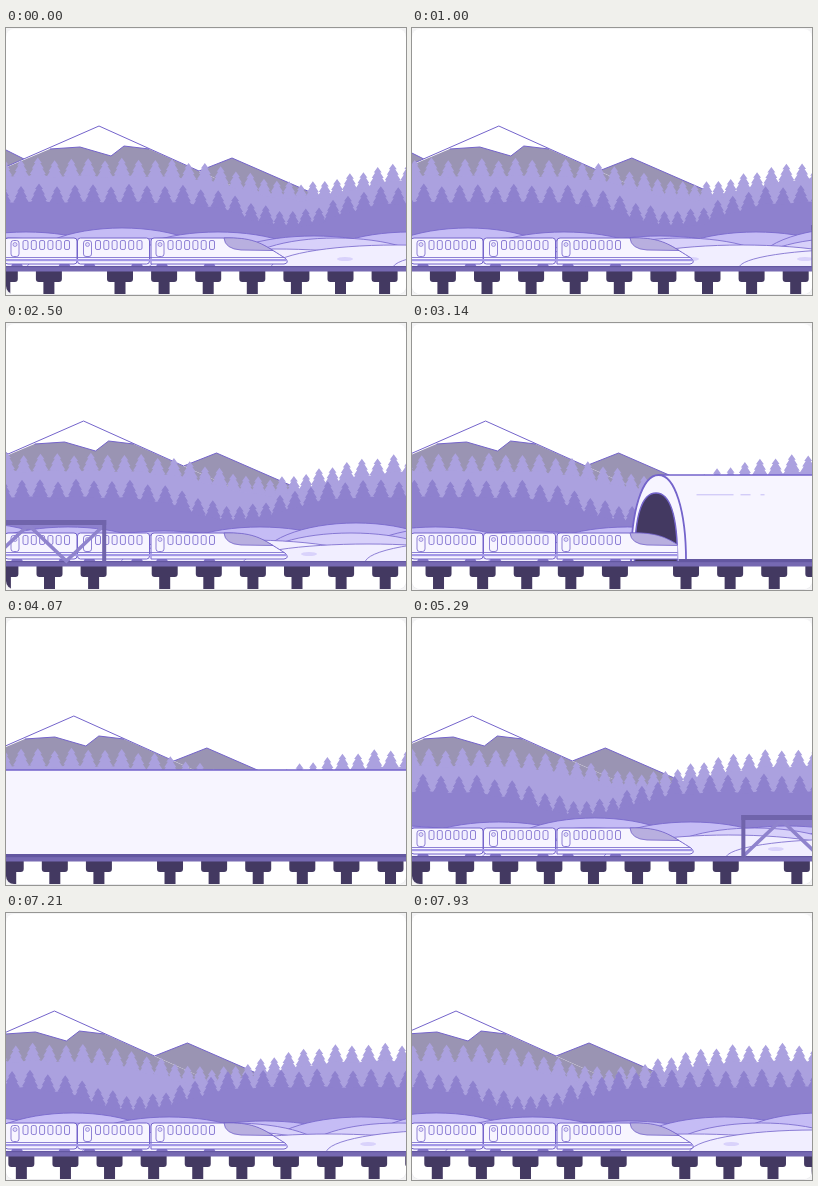
Recreate the animation shown at these times as an HTML page with a canvas. Size 400x267 px, loop 8000 ms.

```html
<!DOCTYPE html>
<html>
<head>
<meta charset="utf-8">
<style>
  html, body { margin: 0; width: 100%; height: 100%; overflow: hidden; background: #f4f4f5; }
  canvas { display: block; width: 400px; height: 267px; }
</style>
</head>
<body>
<canvas id="stage" width="400" height="267"></canvas>
<script>
const ctx = document.getElementById('stage').getContext('2d');
const LOOP = 8000, FPS = 14;
const SPEED = { mountain: 6.18, farTrees: 12.36, nearTrees: 21.2, hills: 60, track: 480 };
const LINE = '#7464cb', PAPER = '#f7f5ff', DARK = '#433961', STEEL = '#7669b2', BEAM = '#7064ab', LILAC = '#c5bcf5';
const PIER_STEP = 44.1, JOINT_GAP = 27;

// The line is built from sections, each a run of evenly spaced piers.
let nextStart = -345.4;
const sections = ['9 plain', '18 plain', '9 truss', '9 plain', '7 tunnel', '8 tunnel', '9 plain', '9 truss', '16 plain', '12 plain']
  .map(text => {
    const [piers, kind] = text.split(' ');
    const start = nextStart;
    nextStart += piers * PIER_STEP + JOINT_GAP;
    return { piers: +piers, kind, start, end: nextStart };
  });
const trusses = sections.filter(section => section.kind === 'truss');
const tunnels = sections.filter(section => section.kind === 'tunnel');
const tunnel = { start: tunnels[0].start - 20, end: tunnels.at(-1).end - 23 };

// Trees stand lower and closer together around the middle of a valley.
function plantForest({ top, depth, centre, width, spacing, color }) {
  const trees = [];
  for (let x = 15 - spacing, i = 0; x < 600; i++) {
    const valley = Math.exp(-(((x - centre) / width) ** 2));
    trees.push([x, top + depth * valley + 1.5 * Math.sin(i * 2.4)]);
    x += spacing - 5 * valley;
  }
  return { trees, color };
}
const farForest = plantForest({ top: 131, depth: 24, centre: 295, width: 75, spacing: 16.8, color: '#aba1df' });
const nearForest = plantForest({ top: 157, depth: 26, centre: 285, width: 60, spacing: 18, color: '#8e81ce' });

function path(points, fill, stroke, width = 1, close = true) {
  ctx.beginPath();
  points.forEach(([x, y]) => ctx.lineTo(x, y));
  if (close) ctx.closePath();
  paint(fill, stroke, width);
}

function paint(fill, stroke, width = 1) {
  if (fill) { ctx.fillStyle = fill; ctx.fill(); }
  if (stroke) { ctx.strokeStyle = stroke; ctx.lineWidth = width; ctx.stroke(); }
}

function rect(x, y, w, h, fill) {
  ctx.fillStyle = fill;
  ctx.fillRect(x, y, w, h);
}

function rounded(x, y, w, h, radius, fill, stroke, width) {
  ctx.beginPath();
  ctx.roundRect(x, y, w, h, radius);
  paint(fill, stroke, width);
}

function layer(shift, draw) {
  ctx.save();
  ctx.translate(-shift, 0);
  draw();
  ctx.restore();
}

function drawMountains() {
  const rock = '#9a94b3';
  const ridge = [[193, 143], [226, 130], [304, 164]];
  const snowLine = [[44, 121], [74, 119], [105, 128], [118, 118], [143, 121]];
  path([[-60, 92], [18, 131], [40, 200], [-60, 200]], rock, LINE);
  path([[160, 159], ...ridge, [304, 200], [160, 200]], rock);
  path(ridge, null, LINE, 1, false);
  path([[-60, 165], [93, 98], [240, 164], [240, 200], [-60, 200]], '#fff');
  path([[-60, 165], ...snowLine, [240, 164], [240, 200], [-60, 200]], rock);
  path(snowLine, null, LINE, 1, false);
  path([[-60, 165], [93, 98], [193, 143]], null, LINE, 1, false);
}

function drawForest({ trees, color }) {
  for (const [x, y] of trees) {
    const side = [];
    for (let tier = 1; tier <= 4; tier++) {
      const half = 2 + 2 * tier, bottom = y + 5.5 * tier;
      side.push([half, bottom], [half - 1.5, bottom]);
    }
    side.push([9, 215]);
    const right = side.map(([dx, ty]) => [x + dx, ty]);
    const left = side.map(([dx, ty]) => [x - dx, ty]).reverse();
    path([[x, y], ...right, ...left], color);
  }
  path([...trees.map(([x, y]) => [x, y + 17]), [600, 230], [-10, 230]], color);
}

function drawMound(x, top, half, fill) {
  ctx.beginPath();
  ctx.ellipse(x, 240, half * 1.25, 240 - top, 0, Math.PI, 0);
  paint(fill, LINE, 0.8);
}

function drawHills() {
  rect(-50, 214, 1100, 26, '#e8e4fd');
  for (let i = 0; i < 11; i++) drawMound(20 + 96 * i, 204 - 4 * Math.sin(i * Math.PI / 2), 78, LILAC);
  for (let i = 0; i < 7; i++) drawMound(330 + 165 * (i - 2), 210, 75, '#d8d1fa');
  for (let i = 0; i < 9; i++) drawMound(24 + 122 * i, i % 2 ? 217 : 221, 100, '#f1eeff');
  for (let i = 0; i < 8; i++) {
    ctx.beginPath();
    ctx.ellipse(111 + 114 * i, 231, 8, 2, 0, 0, 7);
    paint('#d9d2fb');
  }
}

function arch(x, half, top, fill, width) {
  ctx.beginPath();
  ctx.moveTo(x - half, 238);
  ctx.bezierCurveTo(x - half, 188, x - half * 0.6, top, x, top);
  ctx.bezierCurveTo(x + half * 0.6, top, x + half, 188, x + half, 238);
  paint(fill, LINE, width);
}

function drawTunnel() {
  const { start, end } = tunnel, mouth = start + 28;
  rect(mouth, 152, end - mouth, 86, PAPER);
  path([[mouth, 152], [end, 152], [end, 238]], null, LINE, 1.5, false);
  for (const [dx, w] of [[66, 37], [110, 10], [130, 4]]) rect(start + dx, 171.3, w, 1, LILAC);
  arch(mouth, 27.5, 152, PAPER, 1.8);
  arch(mouth - 2.5, 21.5, 170, DARK, 1.5);
  rect(mouth + 20, 236, end - mouth - 20, 3, '#6357a0');
}

function drawNoseCar() {
  ctx.beginPath();
  ctx.moveTo(145, 213);
  ctx.quadraticCurveTo(145, 210, 148, 210);
  ctx.lineTo(220, 210);
  ctx.bezierCurveTo(252, 210, 264, 221, 279, 230);
  ctx.quadraticCurveTo(284, 235, 278, 236);
  ctx.lineTo(145, 236);
  ctx.closePath();
  paint(PAPER, LINE, 1);

  ctx.beginPath();
  ctx.moveTo(218, 210);
  ctx.bezierCurveTo(245, 209, 255, 215, 267, 222.5);
  ctx.lineTo(235, 222);
  ctx.quadraticCurveTo(219, 221, 218, 210);
  paint('#b8afdf', LINE, 0.8);
}

function drawTrain() {
  const cars = [0, 72.5, 145];
  for (const x of cars.flatMap(car => [car + 11, car + 58.5])) {
    path([[x - 4, 235], [x + 4, 235], [x + 6, 239.5], [x - 6, 239.5]], '#8174c1', LINE, 0.7);
  }
  for (const x of cars.slice(0, 2)) rounded(x - 1, 210, 72, 26, 3, PAPER, LINE, 1);
  drawNoseCar();
  rect(0, 229, 278, 0.8, LINE);
  rect(0, 231, 280, 2.2, '#a398e7');
  for (const x of cars) {
    rounded(x + 5, 212.5, 8, 16, 2.5, PAPER, LINE, 0.8);
    rounded(x + 7, 214.5, 4, 4, 2, '#e2ddfa', LINE, 0.6);
    for (let i = 0; i < 6; i++) rounded(x + 17 + i * 8.3, 212.5, 5, 9, 1.5, '#f1eeff', LINE, 0.8);
  }
}

function drawTrack(offset) {
  rect(0, 240, 400, 27, '#fff');
  for (const { piers, start } of sections) {
    for (let i = 0; i < piers; i++) {
      const x = start + 35.5 + i * PIER_STEP - offset;
      if (x < -20 || x > 420) continue;
      rounded(x - 13, 243, 26, 11, [0, 0, 3, 3], DARK);
      rect(x - 5.5, 253, 11, 13, DARK);
    }
  }
  rect(0, 238, 400, 5.5, STEEL);
  rect(0, 238, 400, 1.2, '#6357a0');
}

function drawTruss(section) {
  const start = section.start - 20, end = section.end - 23;
  const bays = 11, bay = (end - start - 4) / bays;
  const zigzag = Array.from({ length: bays + 1 }, (_, i) => [start + 2 + i * bay, i % 2 ? 202 : 238]);
  path(zigzag, null, '#8f83cd', 3.6, false);
  rect(start, 197, end - start, 5, BEAM);
  for (const x of [start, end - 4]) rect(x, 197, 4, 42, BEAM);
}

function drawScene(seconds) {
  const offset = SPEED.track * seconds;
  rect(0, 0, 400, 267, '#f4f4f5');
  rounded(0, 2, 400, 264.5, 8, '#e2e1e6');
  ctx.save();
  ctx.beginPath();
  ctx.roundRect(0, 1, 400, 265, 8);
  ctx.clip();
  rect(0, 0, 400, 267, '#fff');

  layer(SPEED.mountain * seconds, drawMountains);
  layer(SPEED.farTrees * seconds, () => drawForest(farForest));
  layer(SPEED.nearTrees * seconds, () => drawForest(nearForest));
  layer(SPEED.hills * seconds, drawHills);
  layer(offset, drawTunnel);

  // The train shows only outside the tunnel walls.
  const entry = tunnel.start + 47 - offset, exit = tunnel.end - offset;
  ctx.save();
  ctx.beginPath();
  ctx.rect(-10, 0, Math.max(0, entry + 10), 267);
  ctx.rect(Math.max(-10, exit), 0, 5000, 267);
  ctx.clip();
  drawTrain();
  ctx.restore();

  drawTrack(offset);
  layer(offset, () => trusses.forEach(drawTruss));
  ctx.restore();
}

// The picture advances in whole steps; the small lead absorbs timer rounding.
function tick() {
  const time = performance.now() % LOOP;
  const step = Math.floor((time + 5) * FPS / 1000) % (LOOP * FPS / 1000);
  drawScene(step / FPS);
  requestAnimationFrame(tick);
}
tick();
</script>
</body>
</html>
```
